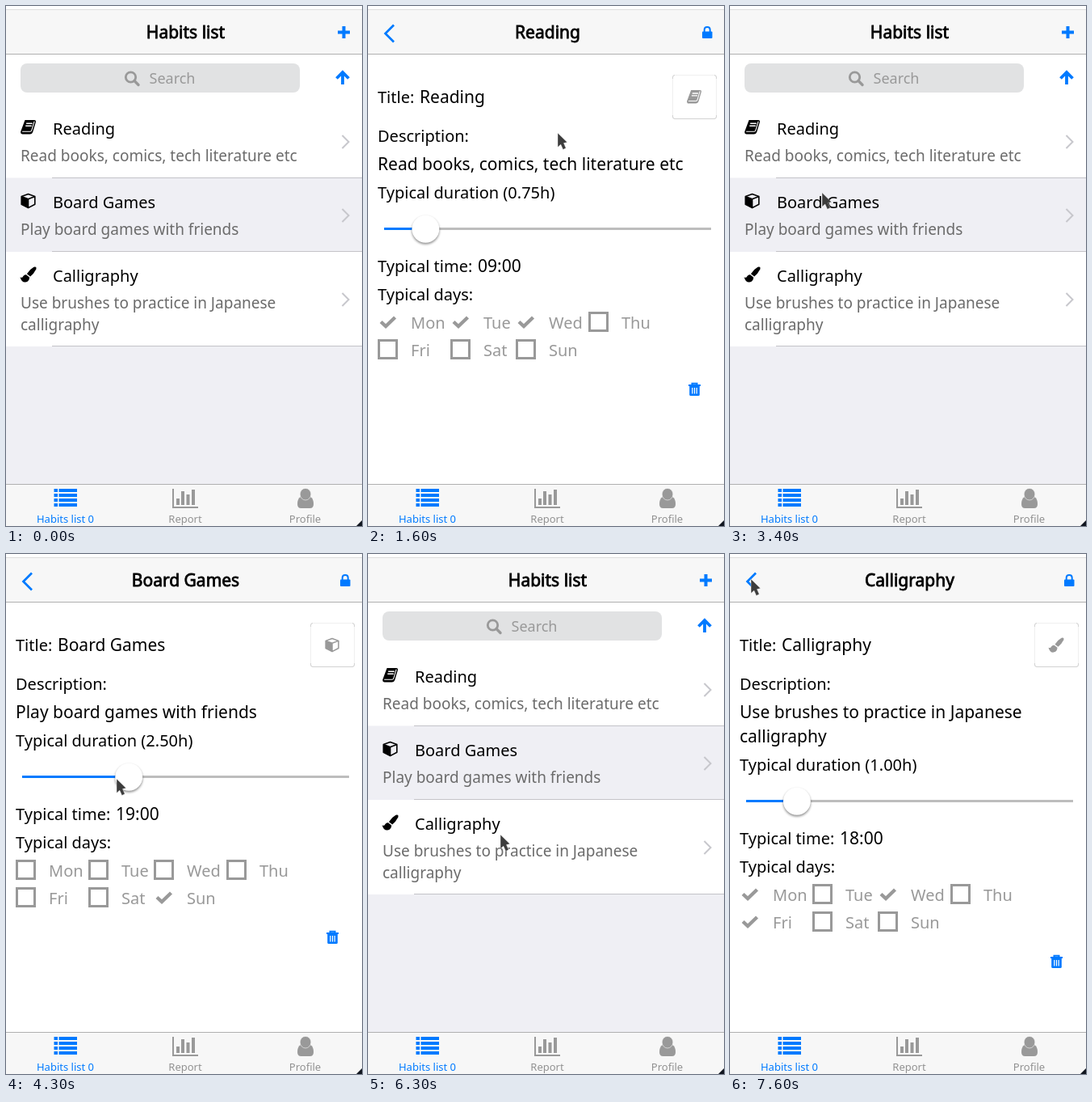
These frames come from a looping animation (441x643 px, 8 s). An HTML page:

```html
<!DOCTYPE html>
<html lang="en">
<head>
<meta charset="utf-8">
<title>Habits list</title>
<style>
  html, body { margin: 0; width: 100%; height: 100%; overflow: hidden; background: #fff; }
  svg { display: block; width: 441px; height: 643px; font-family: "Noto Sans", sans-serif; }
  .title { font-size: 21px; text-anchor: middle; stroke: #000; stroke-width: .8px; }
  .tab { font-size: 13px; text-anchor: middle; }
</style>
</head>
<body>
<svg id="stage" viewBox="0 0 441 643" xmlns="http://www.w3.org/2000/svg"></svg>
<script>
const LOOP = 8000, WIDTH = 441, BACK_SHIFT = 231, SLIDE = 520;
const BLUE = '#007aff', GRAY = '#999';

const habits = [
  { name: 'Reading', icon: 'book', text: ['Read books, comics, tech literature etc'], hours: 0.75, time: '09:00', days: 'Mon Tue Wed' },
  { name: 'Board Games', icon: 'cube', text: ['Play board games with friends'], hours: 2.5, time: '19:00', days: 'Sun' },
  { name: 'Calligraphy', icon: 'brush', text: ['Use brushes to practice in Japanese', 'calligraphy'], hours: 1, time: '18:00', days: 'Mon Wed Fri' }
];

// start, opening or closing, habit, duration; the first leaves the list at rest
const slides = [
  [-SLIDE, false, 0, SLIDE],
  [1070, true, 0, SLIDE], [2874, false, 0, SLIDE],
  [3860, true, 1, 440], [5580, false, 1, SLIDE],
  [6495, true, 2, SLIDE]
];

// time, x, y of the pointer tip
const pointer = [
  [600, 361, 309], [800, 235, 157], [1800, 235, 157], [1900, 200, 149], [2300, 3, 42],
  [2400, 8, 34], [2700, 8, 36], [2800, 22, 42], [3000, 22, 42], [3500, 137, 278],
  [4900, 137, 278], [5400, 24, 34], [5600, 24, 34], [6100, 137, 322], [6200, 137, 322],
  [6300, 164, 347], [6900, 164, 347], [7300, 45, 53], [7400, 45, 53], [7500, 34, 42], [7600, 26, 31]
];

const text = (x, y, size, str, fill = '#000') =>
  `<text x="${x}" y="${y}" font-size="${size}" fill="${fill}">${str}</text>`;
const rect = (x, y, w, h, fill, extra = '') =>
  `<rect x="${x}" y="${y}" width="${w}" height="${h}" fill="${fill}" ${extra}/>`;
const path = (d, fill, extra = '') => `<path d="${d}" fill="${fill}" ${extra}/>`;
const line = (d, color, width, extra = '') =>
  path(d, 'none', `stroke="${color}" stroke-width="${width}" ${extra}`);
const at = (x, y, inner) => `<g transform="translate(${x} ${y})">${inner}</g>`;

// 20 x 20 glyphs
const icons = {
  book: (c, bg) =>
    path('M6 1H17.5Q20 1 19.4 3.5L16 15Q15 18.5 12 18.5H3Q.5 18.5 .6 15.5Z', c) +
    line('M7.6 5.2H15.2M6.7 8.3H14.3', bg, 1.5) +
    line('M2.6 15.2H12.3Q13.8 15.2 14.3 13.6L17.6 2.6', bg, 1.1),
  cube: c =>
    line('M10 1.5L18.3 4.6V14.2L10 18.6L1.7 14.2V4.6ZM1.7 4.6L10 7.7L18.3 4.6M10 7.7V18.6', c, 1.6, 'stroke-linejoin="round"') +
    path('M1.7 4.6L10 7.7V18.6L1.7 14.2Z', c),
  brush: c =>
    path('M17 .8Q20.8 -.2 19.8 3.4Q17 9 12.6 12.4L8.4 9.2Q12 3.5 17 .8Z', c) +
    path('M7.5 10.2L11.6 13.4Q11.5 18.5 6.5 19.6Q1.8 20 0 13.3Q2.7 14.7 3.7 12.2Q5 9.9 7.5 10.2Z', c)
};

function listPage() {
  const chevron = y => line(`M416.5 ${y - 8}L424.5 ${y}L416.5 ${y + 8}`, '#c7c7cc', 2);
  const tops = [121, 212, 303], mids = [168, 259, 363], ends = [212, 303, 420];
  const rows = habits.map((h, i) => {
    const y = tops[i];
    return rect(57, ends[i], 384, 1, '#c4c3c8') +
      at(17.5, y + 19, icons[h.icon]('#000', '#fff')) +
      text(58, y + 38, 20, h.name) +
      h.text.map((s, k) => text(18, y + 71 + 27 * k, 19, s, '#6b6b6b')).join('') +
      chevron(mids[i]);
  });
  return rect(0, 60, WIDTH, 531, '#efeff4') +
    rect(0, 60, WIDTH, 152.5, '#fff') + rect(0, 304, WIDTH, 117, '#fff') +
    rect(18, 71, 346, 36, '#e1e2e3', 'rx="8"') +
    `<circle cx="154.5" cy="88" r="6.2" fill="none" stroke="${GRAY}" stroke-width="2.8"/>` +
    line('M159 92.5L164 97.5', GRAY, 3.4, 'stroke-linecap="round"') +
    text(177.5, 96, 18, 'Search', GRAY) +
    line('M417 97V82M409.5 89.5L417 82L424.5 89.5', BLUE, 3.8) +
    rows.join('');
}

function checkbox(x, y, label, on) {
  const mark = on
    ? line(`M${x + 4} ${y + 12.5}L${x + 10} ${y + 18}L${x + 21.5} ${y + 7}`, GRAY, 4.4)
    : rect(x + 1.5, y + 1.5, 22, 22, 'none', `stroke="${GRAY}" stroke-width="3"`);
  return mark + text(x + 41, y + 21, 20, label, GRAY);
}

// Faint frame with darker corners
function iconBox(h) {
  return rect(377.5, 85.5, 54, 54, '#fff', 'rx="3" stroke="#efefef"') +
    line('M377.5 90V88Q377.5 85.5 380 85.5M429 85.5Q431.5 85.5 431.5 88V90M377.5 135V137Q377.5 139.5 380 139.5H429Q431.5 139.5 431.5 137V135', '#d2d2d2', 1) +
    at(394.5, 103, `<g transform="scale(.95)">${icons[h.icon](GRAY, '#fff')}</g>`);
}

function detailPage(h) {
  const thumb = 36.7 + 46.2 * h.hours;
  const cols = [12, 102, 183, 273];
  const days = ['Mon', 'Tue', 'Wed', 'Thu', 'Fri', 'Sat', 'Sun'].map((d, i) =>
    checkbox(cols[i % 4], i < 4 ? 378 : 412, d, h.days.includes(d)));
  const trash =
    line('M397 469H412M401.5 469V466.7H407.5V469', BLUE, 2) +
    rect(398.2, 469, 12.6, 13, BLUE, 'rx="1.5"') +
    line('M401.8 472V479.5M404.5 472V479.5M407.2 472V479.5', '#fff', 1.2);
  const lower =
    text(12, 238, 20, `Typical duration (${h.hours.toFixed(2)}h)`) +
    rect(20, 274, 405, 3, '#bdbdbd') + rect(20, 274, thumb - 20, 3, BLUE) +
    `<circle cx="${thumb}" cy="277.5" r="17" fill="#000" opacity=".45" filter="url(#soft)"/>` +
    `<circle cx="${thumb}" cy="275.7" r="17" fill="#fff"/>` +
    text(12, 329, 20, 'Typical time:') + text(136, 329, 21, h.time) +
    text(12, 364, 20, 'Typical days:') + days.join('') + trash;
  return rect(0, 60, WIDTH, 531, '#fff') +
    text(12, 120, 20, 'Title:') + text(64, 120, 21, h.name) + iconBox(h) +
    text(12, 168, 20, 'Description:') +
    h.text.map((s, k) => text(12, 203 + 30 * k, 21, s)).join('') +
    at(0, 30 * (h.text.length - 1), lower);
}

function tabBar() {
  const rows = [597, 603, 609, 615].map(y => rect(59.5, y, 4.5, 4, BLUE) + rect(65.5, y, 22.5, 4, BLUE));
  const bars = [[211, 609], [217, 600], [223.5, 604], [230, 598]].map(([x, y]) => rect(x, y, 4, 617 - y, GRAY));
  const label = (x, s, c) => `<text class="tab" x="${x}" y="639" fill="${c}">${s}</text>`;
  return rect(0, 591, WIDTH, 52, '#f7f7f7') + rect(0, 591, WIDTH, 1, '#b0b0b0') +
    rows.join('') + line('M207 597V620H238', GRAY, 2) + bars.join('') +
    path('M365 607Q361 609 361 616Q361 621 365.5 621H376.5Q381 621 381 616Q381 609 377 607Z', GRAY) +
    `<ellipse cx="371" cy="603.7" rx="6.8" ry="7.3" fill="${GRAY}" stroke="#f7f7f7" stroke-width=".6"/>` +
    label(73.5, 'Habits list 0', BLUE) + label(222, 'Report', '#929292') + label(370.5, 'Profile', '#929292') +
    path('M441 636V643H434Z', '#10151f');
}

const stage = document.getElementById('stage');
stage.innerHTML = `
  <defs>
    <linearGradient id="fade"><stop offset="0" stop-opacity="0"/><stop offset="1" stop-opacity=".14"/></linearGradient>
    <filter id="soft" x="-30%" y="-30%" width="160%" height="160%"><feGaussianBlur stdDeviation="1.5"/></filter>
  </defs>
  ${rect(0, 0, WIDTH, 643, '#fff')}
  <g id="list">${listPage()}</g>
  <rect id="dim" y="60" width="441" height="531"/>
  <g id="shadow">${rect(-12, 60, 12, 531, 'url(#fade)')}</g>
  <g id="detail"></g>
  ${rect(0, 4, WIDTH, 56, '#f7f7f7') + rect(0, 4, WIDTH, 1, '#dedede') + rect(0, 59, WIDTH, 1, '#b0b0b0')}
  <text id="listTitle" class="title" y="40">Habits list</text>
  <text id="detailTitle" class="title" y="40"></text>
  <g id="listBar">${line('M418.5 25V40M411 32.5H426', BLUE, 4)}</g>
  <g id="detailBar">
    ${line('M32 23.5L21.5 34L32 44.5', BLUE, 2.7)}
    ${rect(414, 31.5, 12.5, 8.5, BLUE, 'rx="1"')}
    ${line('M416.7 32V29.3Q416.7 26 420.2 26T423.7 29.3V32', BLUE, 2)}
  </g>
  ${tabBar()}
  <g id="pointer">${path('M0 0V17.5L3.8 14.2L6.6 20.5L10.2 18.8L7.5 12.6L11.8 11.6Z', '#3d3d3d', 'stroke="#fff" stroke-width=".4"')}</g>`;

const el = {};
for (const node of stage.querySelectorAll('g[id], text[id], rect[id]')) el[node.id] = node;
const set = (id, name, value) => el[id].setAttribute(name, value);
const move = (id, x, y = 0) => set(id, 'transform', `translate(${x} ${y})`);

// cubic-bezier(.3, .4, 0, .9)
function ease(x) {
  if (x <= 0) return 0;
  if (x >= 1) return 1;
  const curve = (s, a, b) => 3 * (1 - s) * s * ((1 - s) * a + s * b) + s ** 3;
  let lo = 0, hi = 1;
  for (let i = 0; i < 24; i++) {
    const mid = (lo + hi) / 2;
    if (curve(mid, .3, 0) < x) lo = mid; else hi = mid;
  }
  return curve(lo, .4, .9);
}

// The screen refreshes ten times a second, with two short stalls.
function tick(ms) {
  const t = Math.floor(ms / 100) * 100;
  if (t > 4000 && t < 4300) return 4000;
  return t === 6000 ? 5900 : t;
}

function pointerAt(t) {
  const i = pointer.findIndex(k => k[0] > t);
  if (i < 0) return pointer[pointer.length - 1].slice(1);
  const [t0, x0, y0] = pointer[i - 1], [t1, x1, y1] = pointer[i];
  const f = (t - t0) / (t1 - t0);
  return [x0 + (x1 - x0) * f, y0 + (y1 - y0) * f];
}

let shown = -1;
function render(ms) {
  const t = tick(ms);
  const [start, opening, habit, time] = slides.filter(s => s[0] <= t).pop();
  const e = ease((t - start) / time);
  const p = opening ? e : 1 - e;
  const fade = Math.min(1, p * 1.08);
  if (habit !== shown) {
    shown = habit;
    el.detail.innerHTML = detailPage(habits[habit]);
    el.detailTitle.textContent = habits[habit].name;
  }
  move('list', -BACK_SHIFT * p);
  set('dim', 'opacity', 0.03 * p);
  for (const id of ['shadow', 'detail']) {
    move(id, WIDTH * (1 - p));
    set(id, 'visibility', p > 0 ? 'visible' : 'hidden');
  }
  set('shadow', 'opacity', opening ? 0.25 : 1);
  set('listTitle', 'x', 222.5 - BACK_SHIFT * p);
  set('listTitle', 'opacity', 1 - p);
  set('detailTitle', 'x', 222.5 + (opening ? 128 : 182) * (1 - p));
  set('detailTitle', 'opacity', fade);
  set('listBar', 'opacity', 1 - p);
  set('detailBar', 'opacity', fade);
  const visible = t >= pointer[0][0];
  set('pointer', 'visibility', visible ? 'visible' : 'hidden');
  if (visible) move('pointer', ...pointerAt(t));
}

const begin = performance.now();
function loop() {
  render((performance.now() - begin) % LOOP);
  requestAnimationFrame(loop);
}
loop();
</script>
</body>
</html>
```
